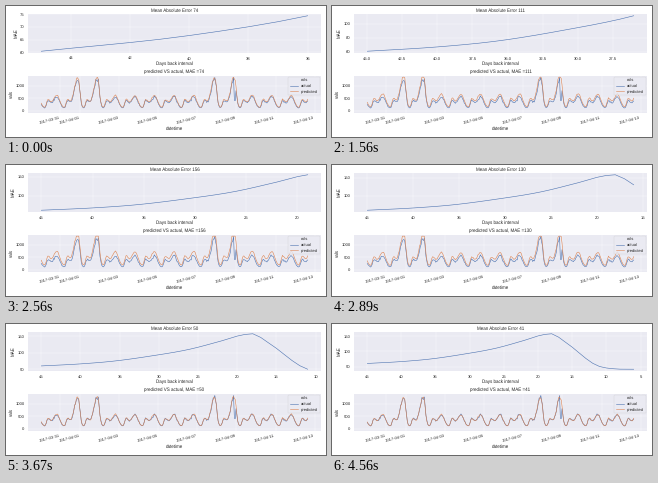
Animation of 320x131 px, one loop 4.78 s. Source, as a matplotlib script:

```python
import numpy as np
import matplotlib.pyplot as plt
from matplotlib.animation import FuncAnimation

W, H, DPI = 320, 131, 100
LOOP_MS, FRAMES = 4780, 43
UNIT = 0.27  # one point of the full-size chart, at this scale
BLUE, ORANGE, INK, PANEL = "#4c72b0", "#dd8452", "#262626", "#eaeaf2"

plt.rcParams.update({
    "font.family": "Liberation Sans", "text.hinting": "none",
    "text.color": INK, "axes.labelcolor": INK,
    "xtick.color": INK, "ytick.color": INK,
    "axes.titlesize": 12 * UNIT, "axes.labelsize": 12 * UNIT,
    "xtick.labelsize": 11 * UNIT, "ytick.labelsize": 11 * UNIT,
    "legend.fontsize": 11 * UNIT,
    "axes.titlepad": 6 * UNIT, "axes.labelpad": 4 * UNIT,
    "xtick.major.size": 0, "ytick.major.size": 0,
    "xtick.major.pad": 9.5 * UNIT, "ytick.major.pad": 9.5 * UNIT,
    "axes.facecolor": PANEL, "axes.grid": True, "axes.axisbelow": True,
    "grid.color": "white", "grid.linewidth": UNIT,
    "lines.linewidth": 1.5 * UNIT,
})

FIRST_DAY, START_DAY, END_DAY = 45, 36, 6
PAUSES = (1, 7, 11, 13, 17, 23, 29, 31, 36)  # frames that repeat the previous day

# Forecast error at a few distances; smooth in between.
ERROR_KEYS = [(45, 60.4), (40, 66.6), (36, 74.4), (31, 90.6), (26, 111.4), (22, 136.4),
              (19, 156), (18, 158), (16, 130.4), (11, 50.4), (9, 43), (6, 41.4)]


def smooth_curve(x, keys):
    """Cubic Hermite curve through the key points."""
    kx, ky = np.transpose(sorted(keys))
    slope = np.gradient(ky, kx)
    i = np.clip(np.searchsorted(kx, x, side="right") - 1, 0, len(kx) - 2)
    width = kx[i + 1] - kx[i]
    u = (x - kx[i]) / width
    ease = u * u * (3 - 2 * u)
    return (ky[i] + (ky[i + 1] - ky[i]) * ease
            + width * u * (1 - u) * (slope[i] * (1 - u) - slope[i + 1] * u))


def bump(center, height, rise, fall):
    offset = hours - center
    return height * np.exp(-(offset / np.where(offset < 0, rise, fall)) ** 2)


# Hourly rate: a morning and an evening wave, with busy Friday and Saturday nights.
hours = np.arange(0.5, 328)
days = hours / 24
base = np.full(hours.size, 85.0)
for day in range(-1, 15):
    midnight = 24 * day
    base += bump(midnight + 8.5, 300, 2.2, 4) + bump(midnight + 19.5, 470, 6, 5)
    if day % 7 in (1, 2):  # day 0 is a Thursday
        base += bump(midnight + 22, 760, 5.5, 2.6)

rng = np.random.default_rng(4)
actual = base * (1 + rng.normal(0, 0.05, days.size))
actual[np.abs(days - 9.92) < 0.04] *= 0.35
model = base * (1 + rng.normal(0, 0.03, days.size))


def predicted(mae):
    lift = 1.2 * (mae - 38) * np.sqrt(base / 400)
    return np.minimum(model + lift, 1335)


def add_axes(top, bottom, xlabel, ylabel):
    ax = fig.add_axes([22 / W, 1 - bottom / H, 293 / W, (bottom - top) / H])
    ax.spines[:].set_visible(False)
    ax.set_xlabel(xlabel)
    ax.set_ylabel(ylabel)
    return ax


def padded(low, high):
    margin = 0.05 * (high - low)
    return low - margin, high + margin


fig = plt.figure(figsize=(W / DPI, H / DPI), dpi=DPI, facecolor="white")
error_ax = add_axes(8, 47, "Days back interval", "MAE")
rate_ax = add_axes(69.5, 106.5, "datetime", "vals")

error_line, = error_ax.plot([], [], color=BLUE)
error_title = error_ax.set_title("")

rate_ax.plot([], [], alpha=0, label="cols")
rate_ax.plot(days, actual, color=BLUE, label="actual")
forecast_line, = rate_ax.plot(days, base, color=ORANGE, label="predicted")
rate_title = rate_ax.set_title("")
rate_ax.set_xlim(*padded(days[0], days[-1]))
rate_ax.set_ylim(-70, 1400)
rate_ax.set_yticks([0, 500, 1000])
rate_ax.set_xticks(
    [1, *range(2, 15, 2)],
    ["2017-03-31"] + [f"2017-04-{d:02d}" for d in range(1, 14, 2)],
    rotation=15, ha="right")
legend = rate_ax.legend(loc="upper right", facecolor=PANEL, edgecolor="0.8",
                        framealpha=0.8, borderaxespad=0.3)
legend.get_frame().set_linewidth(UNIT)


def update(frame):
    step = frame - sum(pause <= frame for pause in PAUSES)
    last_day = max(START_DAY - step, END_DAY)
    shown = np.arange(FIRST_DAY, last_day - 1, -1)
    errors = smooth_curve(shown, ERROR_KEYS)
    mae = errors[-1]

    error_line.set_data(shown, errors)
    low, high = padded(last_day, FIRST_DAY)
    error_ax.set_xlim(high, low)
    error_ax.set_ylim(*padded(errors.min(), errors.max()))
    error_title.set_text(f"Mean Absolute Error {int(mae)}")

    forecast_line.set_ydata(predicted(mae))
    rate_title.set_text(f"predicted VS actual, MAE ={int(mae)}")
    return error_line, forecast_line, error_title, rate_title


anim = FuncAnimation(fig, update, frames=FRAMES, interval=LOOP_MS / FRAMES,
                     repeat=True, repeat_delay=0, blit=False)
plt.show()
```
